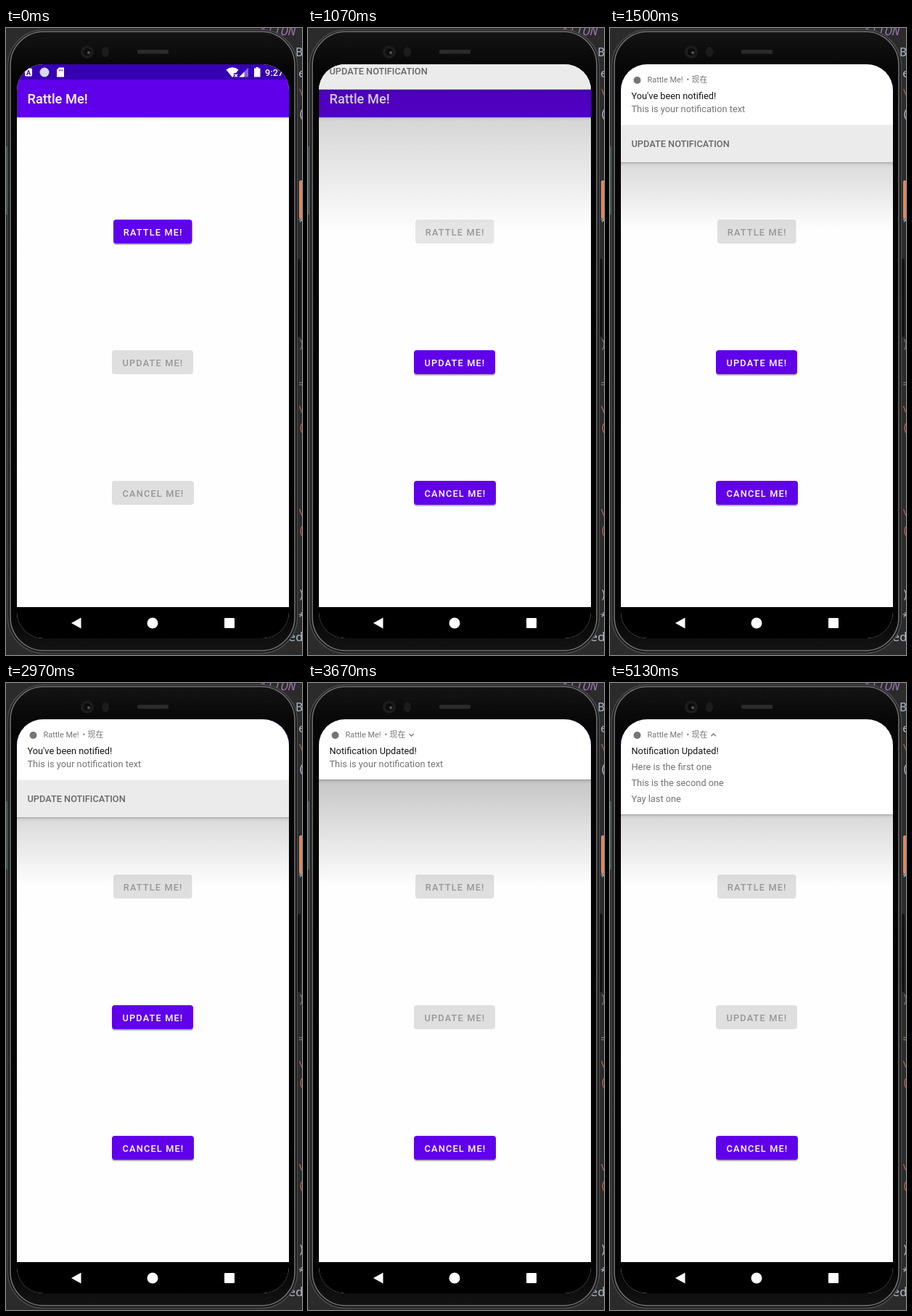
Recreate the animation shown at these times as an HTML page. Size 408 px wide and 864 px high, loop 6060 ms.

```html
<!DOCTYPE html>
<html lang="en">
<head>
<meta charset="utf-8">
<title>Notification demo</title>
<style>
  html, body { margin: 0; width: 100%; height: 100%; overflow: hidden; background: #2b2b2b; }
  svg { display: block; width: 100vw; height: 100vh; }
  text { font-family: Roboto, "Noto Sans CJK SC", "Noto Sans CJK", sans-serif; font-size: 12.77px; white-space: pre; }
  .mono { font-family: "Noto Sans Mono", "DejaVu Sans Mono", monospace; font-size: 17px; }
  .label { font-weight: 500; letter-spacing: .0893em; text-anchor: middle; }
  .head { font-size: 10.9px; fill: #757575; }
  .body { fill: #737373; }
</style>
</head>
<body>
<svg viewBox="0 0 408 864" preserveAspectRatio="none">
  <defs>
    <clipPath id="screen"><rect x="15" y="50" width="375" height="791" rx="36"/></clipPath>
    <clipPath id="cardClip"><rect id="cardBox" x="15" y="50" width="375" height="135"/></clipPath>
    <linearGradient id="shade" x1="0" y1="0" x2="0" y2="1">
      <stop offset="0" stop-opacity=".35"/>
      <stop offset="1" stop-opacity="0"/>
    </linearGradient>
    <linearGradient id="drop" x1="0" y1="0" x2="0" y2="1">
      <stop offset="0" stop-opacity=".28"/>
      <stop offset=".3" stop-opacity=".07"/>
      <stop offset="1" stop-opacity="0"/>
    </linearGradient>
    <linearGradient id="bezel" x1="0" y1="0" x2="0" y2="1">
      <stop offset="0" stop-color="#141414"/>
      <stop offset=".06" stop-color="#060606"/>
      <stop offset=".94" stop-color="#040404"/>
      <stop offset="1" stop-color="#141414"/>
    </linearGradient>
  </defs>

  <rect width="408" height="864" fill="#2b2b2b"/>
  <g id="editor"></g>

  <!-- phone body -->
  <rect x="402" y="318" width="4" height="108" rx="2" fill="#111"/>
  <rect y="163" width="1.5" height="94" fill="#4b6660"/>
  <rect x="2.5" y="2.5" width="399" height="859" rx="50" fill="#151515" stroke="#4a4a4c" stroke-width="1.5"/>
  <rect x="6" y="5" width="392" height="853" rx="46" fill="url(#bezel)" stroke="#707072" stroke-width="1.6"/>
  <circle cx="112" cy="33" r="9" fill="#1c1c1c"/>
  <circle cx="112" cy="33" r="5" fill="#0b0b0b"/>
  <circle cx="114" cy="34" r="2" fill="#555"/>
  <ellipse cx="137" cy="33" rx="5" ry="7" fill="#1c1c1c"/>
  <rect x="181" y="30" width="43" height="5.5" rx="1.5" fill="#2b2b2b"/>

  <g clip-path="url(#screen)">
    <rect x="15" y="50" width="375" height="791" fill="#fefefe"/>
    <rect x="15" y="123" width="375" height="5" fill="url(#drop)"/>
    <rect x="15" y="71" width="375" height="52" fill="#6000ea"/>
    <text x="29.5" y="104.3" fill="#fff" style="font-size:18.25px;font-weight:500">Rattle Me!</text>
    <rect x="15" y="50" width="375" height="21" fill="#3700b3"/>

    <g fill="#fff">
      <circle id="appDot" cx="31" cy="61.5" r="5.5"/>
      <g id="icons">
        <rect x="26" y="55.5" width="10" height="11" rx="1.5"/>
        <text x="31" y="64.6" fill="#3700b3" text-anchor="middle" style="font-size:9px;font-weight:700">A</text>
        <circle cx="53" cy="61" r="6.5" fill="#dcd8ea"/>
        <path d="M73 54.5h7v13h-10v-10z"/>
        <path d="M73.5 57v2.5M75.5 57v2.5M77.5 57v2.5" stroke="#3700b3" stroke-width=".8"/>
      </g>
      <path d="M303.5 57.5Q312 51 320.5 57.5L317 62H314V66L312 68Z"/>
      <path d="M315 63.5l4 4m0-4l-4 4" stroke="#fff" stroke-width="1.2"/>
      <path d="M334 54.5V67.5H321.5Z" opacity=".4"/>
      <path d="M328.5 60.5V67.5H321.5Z"/>
      <path d="M342 55.5h2.5v-1.5h3.5v1.5h2.5v12h-8.5z"/>
      <text id="clock" x="357" y="65.7" style="font-weight:500"></text>
    </g>

    <g id="buttons"></g>
    <rect id="scrim" x="15" y="50" width="375" height="230" fill="url(#shade)"/>

    <g id="card">
      <rect id="cardEdge" x="15" width="375" height="6" fill="url(#drop)"/>
      <g clip-path="url(#cardClip)">
        <rect x="15" y="50" width="375" height="140" fill="#fff"/>
        <circle cx="37.5" cy="72" r="5" fill="#757575"/>
        <text class="head" x="51.5" y="75.4">Rattle Me!</text>
        <text class="head" x="105.5" y="75.4">•</text>
        <text class="head" x="112.5" y="75.4">现在</text>
        <path id="chevron" fill="none" stroke="#757575" stroke-width="1.3"/>
        <text id="heading" x="29.5" y="97.5" fill="#151515"></text>
        <text id="single" class="body" x="29.5" y="115.5">This is your notification text</text>
        <g id="lines" class="body">
          <text x="29.5" y="119.5">Here is the first one</text>
          <text x="29.5" y="141.5">This is the second one</text>
          <text x="29.5" y="163.5">Yay last one</text>
        </g>
        <g id="action">
          <rect x="15" y="133.5" width="375" height="52" fill="#ebebeb"/>
          <text x="29.5" y="164" fill="#686868" style="font-weight:500">UPDATE NOTIFICATION</text>
        </g>
      </g>
    </g>

    <rect x="15" y="798" width="375" height="43" fill="#000"/>
    <g fill="#fff">
      <path d="M90 820L103.5 812.5V827.5Z"/>
      <circle cx="202" cy="820" r="7.5"/>
      <rect x="301" y="813" width="14" height="14" rx="1"/>
    </g>
  </g>
</svg>

<script>
const LOOP = 6060, START = 905, TRAVEL = 139;
const $ = id => document.getElementById(id);
const set = (el, attrs) => { for (const k in attrs) el.setAttribute(k, attrs[k]); };
const add = (parent, tag, attrs, label) => {
  const el = document.createElementNS("http://www.w3.org/2000/svg", tag);
  set(el, attrs);
  if (label) el.textContent = label;
  return parent.appendChild(el);
};
const ramp = (t, a, b) => Math.min(1, Math.max(0, (t - a) / (b - a)));

// y at a given x on a cubic curve; points are [x, y]
function curve(x, a, b, c, d) {
  const at = (u, i) => {
    const v = 1 - u;
    return v * v * v * a[i] + 3 * v * v * u * b[i] + 3 * v * u * u * c[i] + u * u * u * d[i];
  };
  let lo = 0, hi = 1;
  for (let i = 0; i < 24; i++) {
    const mid = (lo + hi) / 2;
    if (at(mid, 0) < x) lo = mid; else hi = mid;
  }
  return at(lo, 1);
}
const ease = x => x <= 0 ? 0 : x >= 1 ? 1 : curve(x, [0, 0], [.4, 0], [.2, 1], [1, 1]);

// drop in, overshoot, dip slightly, settle
function drop(x) {
  const over = 1.125, under = .975;
  if (x <= 0) return 0;
  if (x >= 1) return 1;
  if (x < .5) return curve(x, [0, 0], [.45, 0], [.4, over], [.5, over]);
  if (x < .8) return curve(x, [.5, over], [.62, over], [.56, under], [.8, under]);
  return curve(x, [.8, under], [.88, under], [.84, 1], [1, 1]);
}

// slivers of an editor window behind the phone
[["ATION", 347, 10, "#9876aa"], ["B", 399, 39, "#a9b7c6"], ["e", 403, 68, "#a9b7c6"],
 ["\\", 402, 96, "#a8604a"], ["(", 402, 124, "#a9b7c6"], ["*", 402, 274, "#a9b7c6"],
 [")", 402, 441, "#6a8759"], ["=", 403, 496, "#6a8759"], ["v", 403, 530, "#b0604e"],
 ["(", 402, 556, "#b0604e"], ["v", 403, 672, "#b0604e"], ["(", 402, 698, "#b0604e"],
 [")", 402, 786, "#a9b7c6"], ["*", 402, 818, "#a9b7c6"], ["ed", 389, 845, "#a9b7c6"]]
  .forEach(([s, x, y, fill], i) =>
    add($("editor"), "text", { x, y, fill, class: "mono", "font-style": i ? "normal" : "italic" }, s));
add($("editor"), "rect", { x: 404, y: 210, width: 6, height: 53, rx: 2, fill: "#f08050" });

function makeButton(label, x, y, width, id) {
  const g = add($("buttons"), "g", {});
  const box = { x, y, width, height: 33, rx: 4 };
  const shadow = add(g, "rect", { ...box, y: y + 2, opacity: .28 });
  const face = add(g, "rect", box);
  const clip = add(g, "clipPath", { id });
  add(clip, "rect", box);
  const wave = add(g, "circle", { cx: x + width / 2, cy: y + 16.5, fill: "#fff", "clip-path": `url(#${id})` });
  const text = add(g, "text", { x: x + width / 2 + .5, y: y + 21.6, class: "label" }, label);
  return (on, t, press) => {
    set(face, { fill: on ? "#6000ea" : "#dfdfdf" });
    set(text, { fill: on ? "#fff" : "#979797" });
    set(shadow, { visibility: on ? "visible" : "hidden" });
    set(wave, {
      r: 12 + 50 * ease(ramp(t, press, press + 225)),
      opacity: press ? .26 * ramp(t, press, press + 75) * (1 - ramp(t, press + 250, press + 680)) : 0
    });
  };
}
const notify = makeButton("RATTLE ME!", 148, 264, 108.5, "b1");
const update = makeButton("UPDATE ME!", 146, 444, 112, "b2");
const cancel = makeButton("CANCEL ME!", 146, 624, 113, "b3");

function draw(t) {
  const shown = t >= 870, updated = t >= 3190;
  notify(!shown, t, 730);
  update(shown && t < 3110, t, 2970);
  cancel(shown, t, 0);
  $("clock").textContent = t < 550 ? "9:27" : "9:28";

  set($("scrim"), { opacity: ramp(t, 880, 1160) });
  const slot = ramp(t, 980, 1080);
  set($("appDot"), { opacity: slot });
  set($("icons"), { transform: `translate(${22 * slot} 0)` });

  const shrink = ease(ramp(t, 3200, 3560)), grow = ease(ramp(t, 4350, 4710));
  const height = 135 - 52 * shrink + 48 * grow;
  const y = TRAVEL * (drop((t - START) / 550) - 1);
  set($("card"), { transform: `translate(0 ${y})`, visibility: t > START ? "visible" : "hidden" });
  set($("cardBox"), { height });
  set($("cardEdge"), { y: 50 + height });
  set($("action"), { opacity: 1 - ramp(t, 3200, 3400) });
  $("heading").textContent = updated ? "Notification Updated!" : "You've been notified!";
  set($("chevron"), {
    d: t < 4350 ? "M139.5 70L142.7 73.2L145.9 70" : "M139.5 73.2L142.7 70L145.9 73.2",
    visibility: updated ? "visible" : "hidden"
  });
  set($("single"), { opacity: 1 - ramp(t, 4350, 4500) });
  set($("lines"), { opacity: ramp(t, 4420, 4660) });
}

function tick(now) {
  draw(now % LOOP);
  requestAnimationFrame(tick);
}
draw(0);
requestAnimationFrame(tick);
</script>
</body>
</html>
```
